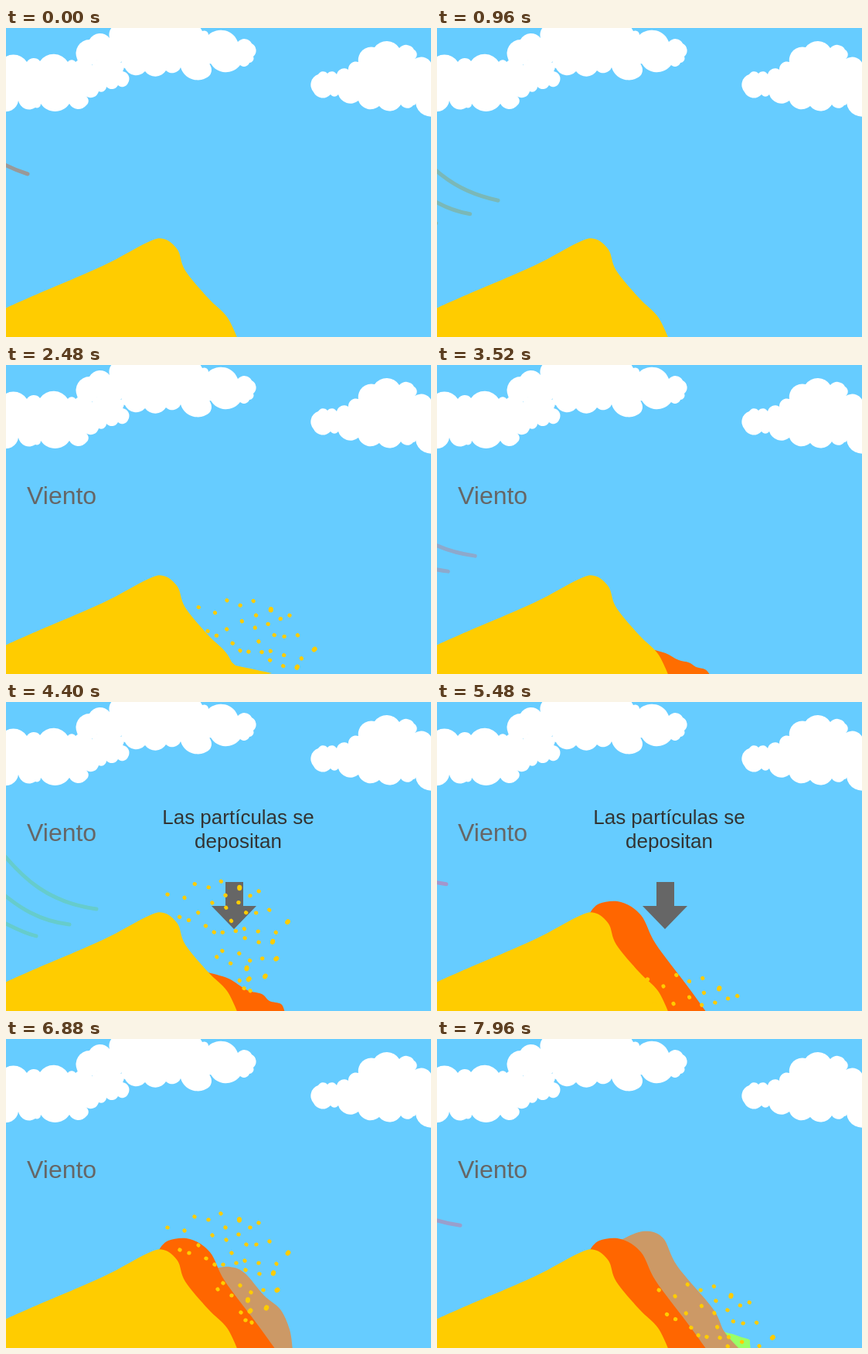
An HTML page for the animation above (8 s loop, 550 by 400 pixels).

```html
<!DOCTYPE html>
<html lang="es">
<head>
<meta charset="utf-8">
<title>Viento y dunas</title>
<style>
  html, body { margin: 0; width: 100%; height: 100%; overflow: hidden; background: #66ccff; }
  svg { display: block; width: 550px; height: 400px; background: #66ccff; }
  text { font-family: "Liberation Sans", Arial, sans-serif; }
</style>
</head>
<body>
<svg viewBox="0 0 550 400">
  <g id="clouds" fill="#fff"></g>
  <g id="gusts" fill="none" stroke-width="5" stroke-linecap="round">
    <path d="M-15 166C18 208 52 238 113 246"/>
    <path d="M-12 223C12 244 40 262 78 266"/>
    <path d="M-12 261C2 268 18 277 35 281"/>
  </g>
  <g id="layers"></g>
  <path id="dune" fill="#ffcc00"/>
  <text id="wind" x="27" y="180" font-size="32" fill="#666">Viento</text>
  <g id="note">
    <g font-size="26" fill="#333" text-anchor="middle">
      <text x="300.5" y="158">Las partículas se</text>
      <text x="300.5" y="189">depositan</text>
    </g>
    <path fill="#666" d="M284 233H307V264H324L295 294L266 264H284Z"/>
  </g>
  <g id="sand" fill="#ffcc00"></g>
</svg>
<script>
const LOOP = 8000, STEP = 40;
const $ = id => document.getElementById(id);
const lerp = (a, b, k) => a + (b - a) * k;
const mix = (a, b, k) => a.map((v, i) => lerp(v, b[i], k));
const rgb = c => `rgb(${c.map(Math.round)})`;
const pairs = flat => flat.flatMap((v, i) => i % 2 ? [] : [[v, flat[i + 1]]]);

function add(parent, tag, attrs) {
  const el = document.createElementNS("http://www.w3.org/2000/svg", tag);
  for (const name in attrs) el.setAttribute(name, attrs[name]);
  return parent.appendChild(el);
}

// Rows are [time, ...values]; values are held outside the table.
function sample(rows, t) {
  const next = rows.findIndex(r => r[0] > t);
  if (next === 0) return rows[0].slice(1);
  if (next < 0) return rows[rows.length - 1].slice(1);
  const a = rows[next - 1], b = rows[next];
  return mix(a, b, (t - a[0]) / (b[0] - a[0])).slice(1);
}

// Smooth open curve through flat x,y pairs.
function curve(flat) {
  const pts = pairs(flat), last = pts.length - 1;
  const at = i => pts[Math.max(0, Math.min(last, i))];
  let d = "M" + at(0);
  for (let i = 0; i < last; i++) {
    const [p, a, b, q] = [at(i - 1), at(i), at(i + 1), at(i + 2)];
    const c1 = a.map((v, k) => (v + (b[k] - p[k]) / 6).toFixed(2));
    const c2 = b.map((v, k) => (v - (q[k] - a[k]) / 6).toFixed(2));
    d += `C${c1} ${c2} ${b}`;
  }
  return d;
}

// A cloud is a ring of notches joined by outward bumps.
function cloud(...flat) {
  const pts = pairs(flat);
  let d = "M" + pts[0];
  pts.forEach(([x, y], i) => {
    const [u, v] = pts[(i + 1) % pts.length];
    const r = Math.hypot(u - x, v - y) * .6;
    d += `A${r} ${r} 0 0 1 ${u} ${v}`;
  });
  add($("clouds"), "path", { d: d + "Z" });
}

cloud(-8,44, 27,44, 44,43, 80,44, 90,44, 112,49, 115,44, 147,44, 151,56, 158,71, 145,74,
  130,76, 120,82, 103,88, 104,100, 82,98, 45,98, 38,103, 16,94, -8,106);
cloud(92,40, 108,15, 134,13, 150,-6, 254,4, 262,9, 300,18, 318,20, 320,37, 315,45, 303,48,
  265,46, 258,43, 263,62, 226,51, 207,55, 180,56, 154,52, 150,43, 131,41, 118,41, 108,46);
cloud(398,83, 404,60, 416,59, 428,60, 443,54, 456,44, 477,25, 509,26, 528,28, 529,40,
  552,50, 560,112, 530,97, 527,100, 511,99, 483,101, 456,94, 430,86, 420,86);

$("dune").setAttribute("d", curve([-10,367, 30,349, 125,308, 182,278, 204,273, 222,287,
  232,314, 262,350, 286,374, 301,405]) + "L-10 405Z");

// Deposited layers, back to front: crest of seven points per time, closed behind the layer in front.
const flat = (x0, y0, x1, y1) =>
  Array.from({ length: 7 }, (_, i) => [lerp(x0, x1, i / 6), lerp(y0, y1, i / 6)]).flat();
const layers = [
  { colour: [[0, 153, 255, 102]], base: "L385 410L362 388Z", crest: [
    [7760, ...flat(375, 403, 405, 403)],
    [7960, 368,376, 374,380, 383,382, 394,386, 404,389, 405,394, 406,402]] },
  { colour: [[0, 204, 153, 102]], base: "L335 410L240 290Z", crest: [
    [5560, ...flat(336, 402, 378, 404)],
    [6880, 268,297, 290,295, 309,303, 334,332, 355,350, 367,376, 371,402],
    [7920, 236,261, 266,249, 292,257, 311,294, 357,349, 372,379, 392,402]] },
  { colour: [[2480, 255, 204, 0], [3600, 255, 102, 0]], base: "L290 410L198 300Z", crest: [
    [2320, ...flat(297, 402, 344, 403)],
    [2480, ...flat(297, 389, 344, 399)],
    [4400, 261,350, 288,358, 312,373, 331,378, 341,387, 356,391, 361,402],
    [5440, 197,274, 210,261, 238,259, 264,276, 283,313, 322,365, 349,402]] }
];
layers.forEach(l => l.el = add($("layers"), "path", {}));

// Grains around the pivot; the first few are larger.
const PIVOT = [287, 297], LARGE = 7;
const grains = [302,234, 365,277, 346,303, 351,325, 337,348, 313,338, 316,352,
  209,244, 231,248, 244,230, 262,234, 278,226, 327,238, 316,244, 284,244, 301,253, 267,254,
  225,273, 237,277, 249,267, 259,284, 285,260, 270,292, 281,292, 292,277, 311,266, 324,266,
  341,262, 298,290, 309,287, 310,299, 327,290, 350,291, 328,304, 274,324, 281,316, 292,332,
  303,319, 317,328, 333,325, 304,354, 310,364, 318,367];
pairs(grains).forEach(([gx, gy], i) => {
  const x = gx - PIVOT[0], y = gy - PIVOT[1], big = i < LARGE;
  add($("sand"), "ellipse", { cx: x, cy: y, rx: big ? 3.1 : 2.7, ry: big ? 3.7 : 2.5,
    transform: `rotate(${i * 37 % 60} ${x} ${y})` });
});

// Sand flights: [time, x, y, angle, scale]
const lift = t => [t, 206, 270, -50, .51];
const flights = [
  [lift(1240), [1760, 284, 293, 0, 1], [3440, 366, 489, 18.7, 1]],
  [lift(3800), [4320, 282.5, 294, 0, 1], [6000, 360, 489, 19.5, 1]],
  [lift(6320), [6840, 284.5, 293.5, -.4, 1], [8000, 356.5, 395.1, 11.1, 1]]
];

// Gusts: [time, tip x, tip y, angle, red, green, blue]
const TIP = [113, 246], GREY = [153, 153, 153], MAUVE = [170, 144, 204], TEAL = [102, 204, 204];
const laterGust = (start, end) => {
  const x = (end - start) * .077;
  return [[start, 0, 232, 0, ...MAUVE], [end, x, 232 + x * .307, 0, ...mix(MAUVE, TEAL, x / 117)]];
};
const gusts = [
  [[0, 28, 189, 10, ...GREY], [1600, ...TIP, 0, ...TEAL], [1720, 119, 250, 0, ...TEAL]],
  laterGust(2880, 4440), laterGust(5324, 6840), laterGust(7570, 8000)
];

const active = (tracks, t) => tracks.find(r => t >= r[0][0] && t < r[r.length - 1][0]);
const show = (el, on) => el.style.display = on ? "" : "none";

function draw(t) {
  show($("wind"), t >= 1240);
  show($("note"), t >= 3800 && t < 6320);

  const gust = active(gusts, t);
  show($("gusts"), gust);
  if (gust) {
    const [x, y, angle, ...colour] = sample(gust, t);
    $("gusts").setAttribute("transform", `translate(${x} ${y}) rotate(${angle}) translate(${-TIP[0]} ${-TIP[1]})`);
    $("gusts").setAttribute("stroke", rgb(colour));
  }

  const flight = active(flights, t);
  show($("sand"), flight);
  if (flight) {
    const [x, y, angle, scale] = sample(flight, t);
    $("sand").setAttribute("transform", `translate(${x} ${y}) rotate(${angle}) scale(${scale})`);
  }

  for (const { el, colour, base, crest } of layers) {
    show(el, t >= crest[0][0]);
    el.setAttribute("d", curve(sample(crest, t)) + base);
    el.setAttribute("fill", rgb(sample(colour, t)));
  }
}

const begin = performance.now();
function tick() {
  const t = (performance.now() - begin) % LOOP;
  draw(Math.floor(t / STEP) * STEP);
  requestAnimationFrame(tick);
}
tick();
</script>
</body>
</html>
```
